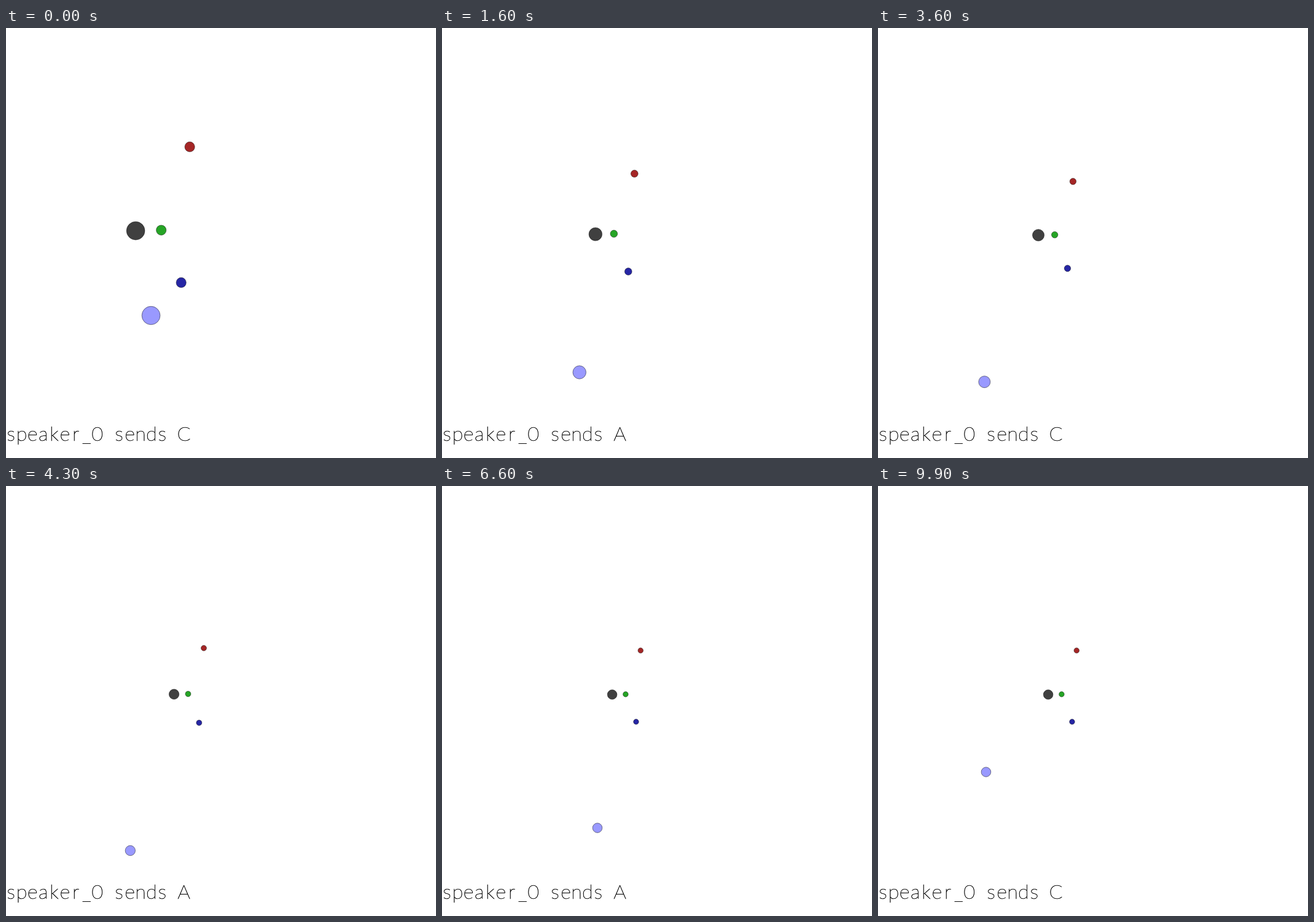
Recreate the animation shown at these times as an HTML page. Size 700 px wide and 700 px high, loop 10 s.

```html
<!DOCTYPE html>
<html lang="en">
<head>
<meta charset="utf-8">
<title>Speaker and listener</title>
<style>
  html, body { margin: 0; width: 100%; height: 100%; overflow: hidden; background: #fff; }
  svg { display: block; width: 100vw; height: 100vh; }
  circle { stroke: #000; stroke-opacity: .45; stroke-width: 1; }
  text { font: 100 32.5px Lato, Roboto, sans-serif; text-anchor: middle; stroke: #000; stroke-width: .55; }
</style>
</head>
<body>
<svg id="stage" viewBox="0 0 700 700"></svg>
<script>
const STEP = 100, STEPS = 100, HALF = 350;
const AGENT = .077, LANDMARK = .042;
const svg = document.getElementById('stage');

// World units, y pointing down.
const speaker = { x: -.718, y: -.103, size: AGENT, color: '#404040' };
const red = { x: -.263, y: -.809, size: LANDMARK, color: '#a52626' };
const green = { x: -.503, y: -.108, size: LANDMARK, color: '#26a526' };
const blue = { x: -.335, y: .333, size: LANDMARK, color: '#2626a5' };
const listener = { size: AGENT, color: '#9999ff' };
const bodies = [speaker, red, green, blue, listener];

// Turning points of the listener's walk.
const walk = [
  { at: 0, x: -.589, y: .61 },
  { at: 16, x: -.905, y: 1.509 },
  { at: 28, x: -1.446, y: 1.405 },
  { at: 43, x: -1.387, y: 2.287 },
  { at: 50, x: -1.28, y: 2.446 },
  { at: 66, x: -.955, y: 2.034 },
  { at: 81, x: -1.704, y: 1.236 },
  { at: 99, x: -1.714, y: 1.138 }
];

function rate(i, axis) {
  const k = Math.max(0, Math.min(i, walk.length - 2));
  const a = walk[k], b = walk[k + 1];
  return (b[axis] - a[axis]) / (b.at - a.at);
}

// Harmonic mean of both sides, so the curve never overshoots a turn.
function slope(i, axis) {
  const before = rate(i - 1, axis), after = rate(i, axis);
  return before * after > 0 ? 2 * before * after / (before + after) : 0;
}

function along(step, axis) {
  const next = walk.findIndex(point => point.at >= step);
  const i = Math.max(0, next - 1), a = walk[i], b = walk[i + 1];
  const span = b.at - a.at, u = (step - a.at) / span, v = 1 - u;
  return v * v * (1 + 2 * u) * a[axis] + u * u * (1 + 2 * v) * b[axis]
    + span * u * v * (v * slope(i, axis) - u * slope(i + 1, axis));
}

// The camera only zooms out, keeping one unit of margin.
let reach = Math.abs(red.y);
const states = Array.from({ length: STEPS }, (_, step) => {
  const x = along(step, 'x'), y = along(step, 'y');
  reach = Math.max(reach, Math.abs(x), Math.abs(y));
  return { x, y, scale: HALF / (reach + 1), letter: step % 9 < 3 ? 'C' : 'A' };
});

function set(node, attrs) {
  for (const key in attrs) node.setAttribute(key, attrs[key]);
}
function add(tag, attrs) {
  const node = document.createElementNS('http://www.w3.org/2000/svg', tag);
  set(node, attrs);
  return svg.appendChild(node);
}

for (const body of bodies) body.node = add('circle', { fill: body.color });
const message = 'speaker_0 sends ';
const label = add('text', {
  y: 672,
  x: Array.from(message + 'C', (_, i) => 8 + 17.6 * i).join(' ')
});

function draw(time) {
  const { x, y, scale, letter } = states[Math.floor(time / STEP) % STEPS];
  Object.assign(listener, { x, y });
  for (const body of bodies) {
    set(body.node, {
      cx: HALF + body.x * scale,
      cy: HALF + body.y * scale,
      r: body.size * scale
    });
  }
  label.textContent = message + letter;
}

const start = performance.now();
function tick() {
  draw(performance.now() - start);
  requestAnimationFrame(tick);
}
tick();
</script>
</body>
</html>
```
